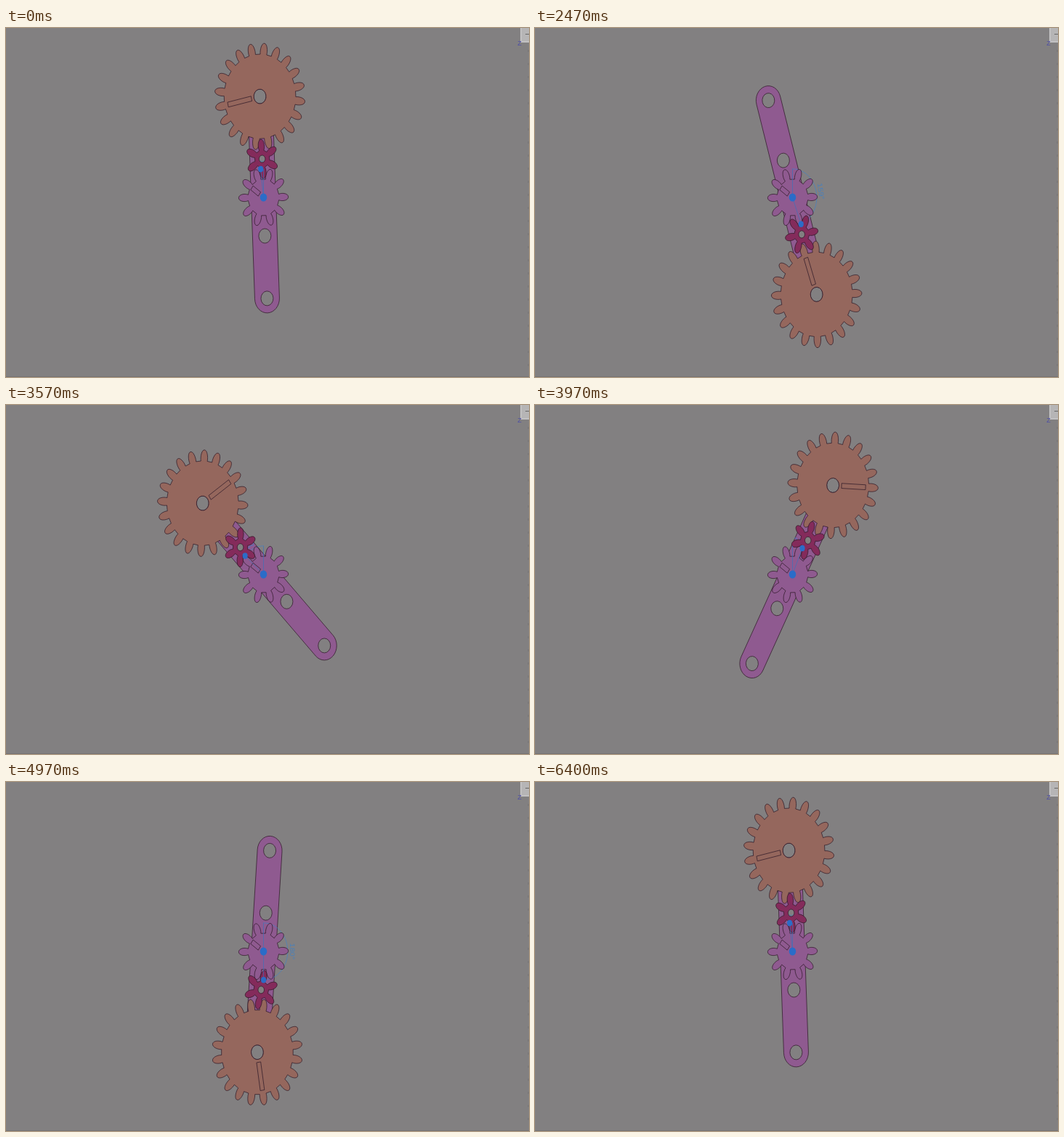
An HTML page with a canvas for the animation above (6530 ms loop, 720 px wide and 480 px high).

```html
<!DOCTYPE html>
<html lang="en">
<head>
<meta charset="utf-8">
<title>Planetary gear</title>
<style>
  html, body { margin: 0; width: 100%; height: 100%; overflow: hidden; background: #828081; }
  canvas { display: block; }
</style>
</head>
<body>
<canvas id="stage" width="720" height="480"></canvas>
<script>
const ctx = document.getElementById('stage').getContext('2d');
const LOOP = 6530, DEG = Math.PI / 180, TAU = Math.PI * 2;
const MODULE = 6.62, NEAR = 53, FAR = 139, DIAL = 39.3;
const LINE = 'rgba(45, 24, 38, .72)', BLUE = '#2b6cc8';

// Time in ms, arm travel in degrees
const KEYS = [
  [830, 0], [1100, 12], [1430, 43.4], [2130, 136.5], [2470, 165.9],
  [2800, 223.6], [3470, 302], [3570, 317], [4130, 419.7],
  [4470, 461], [4800, 519.5], [5430, 619.2], [6130, 720]
];

function travel(t) {
  if (t <= KEYS[0][0]) return 0;
  const i = KEYS.findIndex(k => k[0] > t);
  if (i < 0) return 720;
  const [t0, a0] = KEYS[i - 1], [t1, a1] = KEYS[i];
  return a0 + (a1 - a0) * (t - t0) / (t1 - t0);
}

// The view is narrowed sideways; everything turns about the central gear.
function place(turn = 0, x = 0, y = 0) {
  ctx.setTransform(.849, 0, 0, 1, 354.5, 233);
  ctx.translate(x, y);
  ctx.rotate(turn * DEG);
}

const polar = (angle, r) => [Math.sin(angle * DEG) * r, -Math.cos(angle * DEG) * r];

function stroke(color, width = 1) {
  ctx.setTransform(1, 0, 0, 1, 0, 0);
  ctx.strokeStyle = color;
  ctx.lineWidth = width;
  ctx.stroke();
}

function paint(color) {
  ctx.fillStyle = color;
  ctx.fill('evenodd');
  stroke(LINE);
}

function hole(y, r) {
  ctx.moveTo(r, y);
  ctx.arc(0, y, r, 0, TAU);
}

function arm(angle) {
  place(angle);
  ctx.beginPath();
  ctx.arc(0, -FAR, 20, Math.PI, 0);
  ctx.arc(0, FAR, 20, 0, Math.PI);
  ctx.closePath();
  for (const y of [-FAR, -NEAR, NEAR, FAR]) hole(y, 10);
  paint('#8f5a90');
}

function gear(teeth, [x, y], turn, color, bore, slot) {
  const pitch = teeth * MODULE / 2, root = pitch - 8.3, tip = pitch + MODULE + .5;
  const base = 3.2 + root * .035;
  place(turn, x, y);
  ctx.beginPath();
  for (let i = 0; i < teeth; i++) {
    ctx[i ? 'lineTo' : 'moveTo'](-base, -root);
    ctx.bezierCurveTo(-6.4, -root - 6, -4.6, -tip, 0, -tip);
    ctx.bezierCurveTo(4.6, -tip, 6.4, -root - 6, base, -root);
    ctx.rotate(TAU / teeth);
  }
  ctx.closePath();
  if (bore) hole(0, bore);
  paint(color);
  if (slot) {
    const [inner, outer] = slot;
    place(turn, x, y);
    ctx.beginPath();
    ctx.rect(-3.4, -outer, 6.8, outer - inner);
    stroke(LINE);
  }
}

function dial(angle) {
  const a = angle - 360 * Math.round(angle / 360);
  place();
  ctx.beginPath();
  ctx.arc(0, 0, DIAL, -Math.PI / 2, a * DEG - Math.PI / 2, a < 0);
  stroke('rgba(65, 130, 200, .65)');
  place(a / 2, ...polar(a / 2, 46));
  ctx.font = '11px "Liberation Sans", Arial, sans-serif';
  ctx.textAlign = 'center';
  ctx.textBaseline = 'middle';
  ctx.fillStyle = 'rgba(60, 128, 200, .8)';
  ctx.fillText(Math.round(Math.abs(a)) + '°', 0, 0);
}

function pointer(angle) {
  const end = polar(angle, DIAL);
  place();
  ctx.beginPath();
  ctx.moveTo(0, -DIAL);
  ctx.lineTo(0, 0);
  ctx.lineTo(...end);
  stroke('rgba(55, 115, 190, .65)');
  ctx.fillStyle = BLUE;
  for (const [x, y, r] of [[0, 0, 5.6], [...end, 4.2]]) {
    place(0, x, y);
    ctx.beginPath();
    ctx.arc(0, 0, r, 0, TAU);
    ctx.fill();
  }
}

function box(color, x, y, w, h) {
  ctx.fillStyle = color;
  ctx.fillRect(x, y, w, h);
}

function backdrop() {
  ctx.setTransform(1, 0, 0, 1, 0, 0);
  box('#828081', 0, 0, 720, 480);
  box('#757374', 0, 479, 720, 1);
  for (let y = 30; y < 480; y += 18) box('#7b797a', 718, y, 2, 3);
  box('#c2c1c2', 708, 0, 12, 20);
  box('#b6b5b6', 710, 0, 10, 18);
  box('#666', 715, 8, 5, 1);
  ctx.font = '9px "Liberation Sans", Arial, sans-serif';
  ctx.textAlign = 'center';
  ctx.textBaseline = 'middle';
  ctx.fillStyle = '#4c4ca8';
  ctx.fillText('Z', 707, 22);
}

function draw(now) {
  const d = travel(now % LOOP), angle = d - 2.4;
  backdrop();
  arm(angle);
  dial(angle - 4.3);
  gear(20, polar(angle, FAR), 257.7 + d / 2, '#95675d', 10, [14, 53]);
  gear(10, [0, 0], 305, '#8f5a90', 0, [8, 23]);
  gear(6, polar(angle, NEAR), d * 8 / 3 - 4.6, '#842b5b', 5);
  pointer(angle - 4.3);
  requestAnimationFrame(draw);
}
requestAnimationFrame(draw);
</script>
</body>
</html>
```
